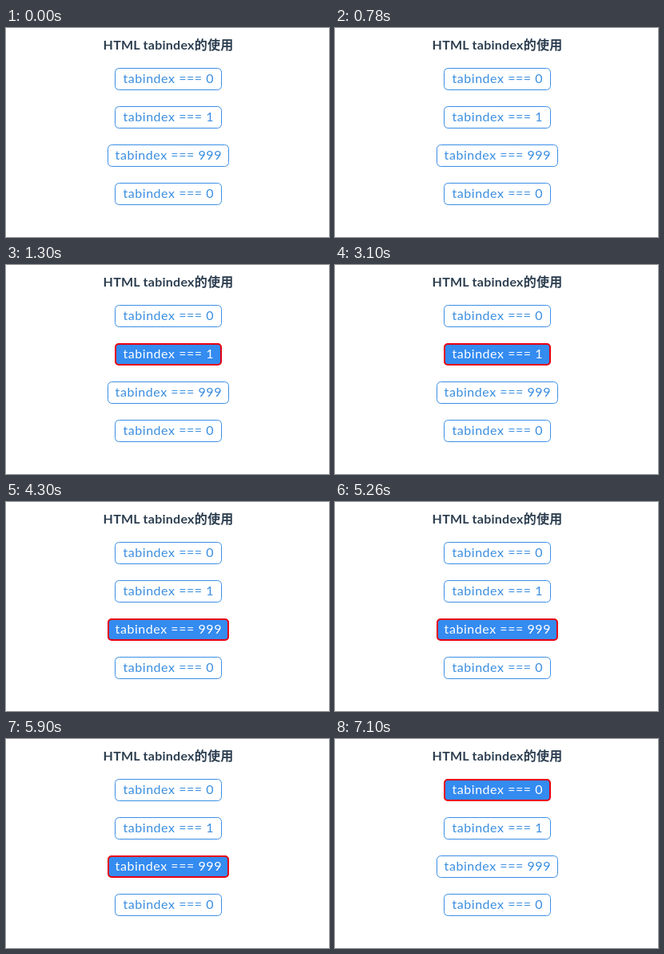
An HTML page for the animation above (8 s loop, 404x262 px).

```html
<!DOCTYPE html>
<html lang="zh">
<head>
<meta charset="utf-8">
<style>
html, body { margin: 0; width: 100%; height: 100%; overflow: hidden; background: #fff; }
svg { display: block; }
text { font: 16px Lato, "Noto Sans CJK SC", "Noto Sans CJK", sans-serif; text-anchor: middle; letter-spacing: .55px; fill: #3a8ee0; }
.title { font-weight: 700; letter-spacing: .25px; fill: #2c3e50; }
rect { fill: #fff; stroke: #3a8ee6; }
.focus rect { fill: #348bf0; stroke: #e60012; stroke-width: 2; }
.focus text { fill: #fff; }
</style>
</head>
<body>
<svg id="stage" width="404" height="262">
  <text class="title" x="203" y="27">HTML tabindex的使用</text>
</svg>
<script>
const stage = document.getElementById("stage");
const LOOP = 8000;
// start time and focused button
const steps = [[0, -1], [1300, 1], [4300, 2], [7100, 0]];

function add(parent, tag, attrs, text = "") {
  const el = document.createElementNS("http://www.w3.org/2000/svg", tag);
  for (const key in attrs) el.setAttribute(key, attrs[key]);
  el.textContent = text;
  return parent.appendChild(el);
}

const buttons = [0, 1, 999, 0].map((value, i) => {
  const group = add(stage, "g", {});
  const width = value === 999 ? 152 : 134;
  const y = 50 + i * 48;
  const rect = add(group, "rect", {});
  add(group, "text", { x: 203.3, y: y + 19 }, `tabindex === ${value}`);
  return { group, rect, width, y };
});

function setFocus(index) {
  buttons.forEach(({ group, rect, width, y }, i) => {
    const on = i === index;
    const inset = on ? 1 : 0.5;
    const box = { x: 203 - width / 2 + inset, y: y + inset,
      width: width - 2 * inset, height: 28 - 2 * inset, rx: on ? 4 : 5 };
    for (const key in box) rect.setAttribute(key, box[key]);
    group.setAttribute("class", on ? "focus" : "");
  });
}

const start = performance.now();
function draw() {
  const t = (performance.now() - start) % LOOP;
  setFocus(steps.findLast(([from]) => t >= from)[1]);
  requestAnimationFrame(draw);
}
draw();
</script>
</body>
</html>
```
